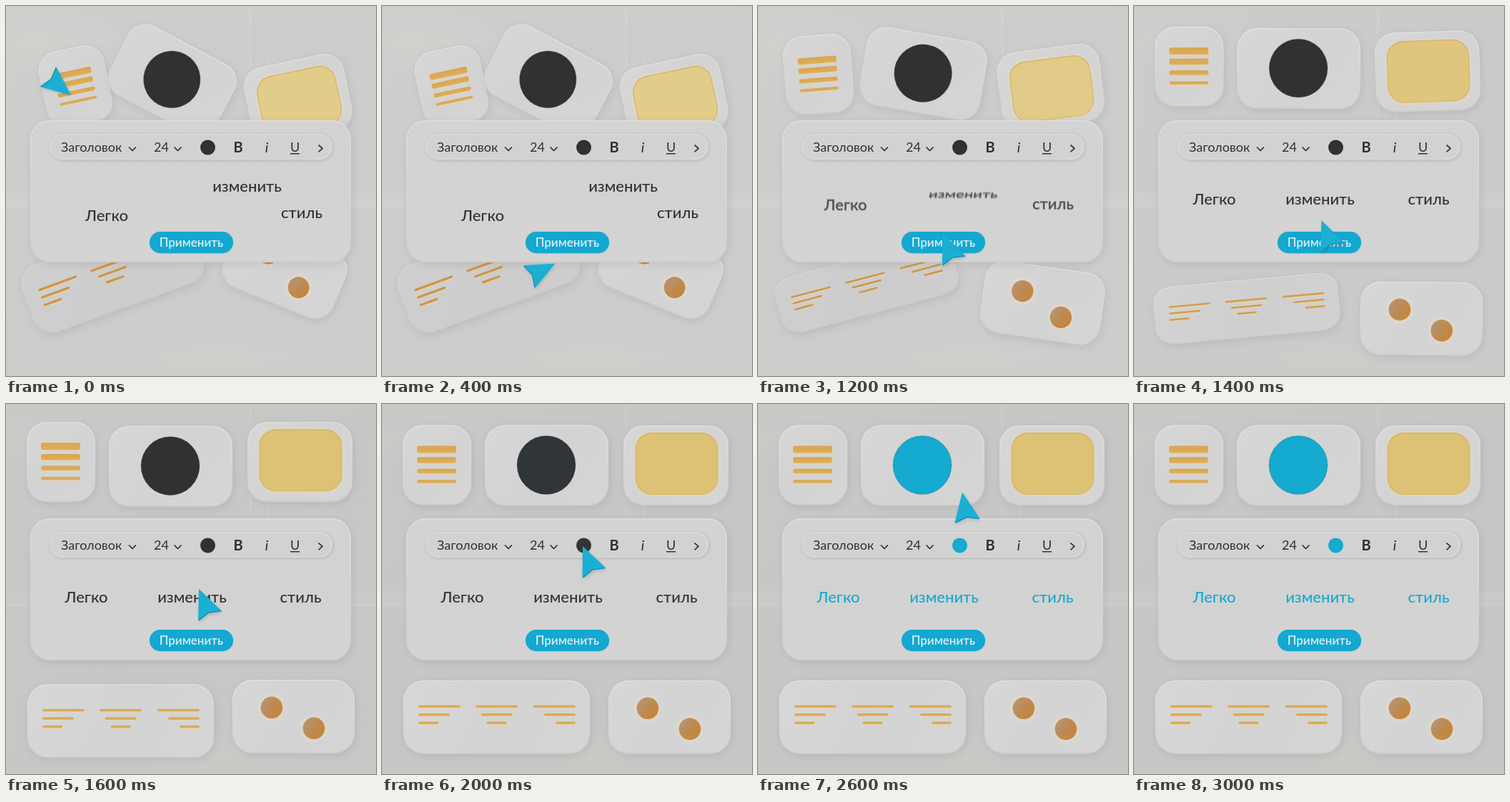
Animation, 518 px wide and 518 px high, one loop 4000 ms. Source, as an HTML page with a canvas:

```html
<!DOCTYPE html>
<html lang="ru">
<head>
<meta charset="utf-8">
<title>Легко изменить стиль</title>
<style>
html, body { margin: 0; width: 100%; height: 100%; overflow: hidden; background: #cbcbca; }
canvas { display: block; width: 518px; height: 518px; }
</style>
</head>
<body>
<canvas id="stage" width="518" height="518"></canvas>
<script>
const SIZE = 518, LOOP = 4000, STEP = 100, LAST = 3000;
const INK = [49, 49, 50], BLUE = [21, 170, 208];
const GOLD = [215, 166, 82], BROWN = [203, 146, 68];
const SAND = [221, 193, 117], PALE = [226, 204, 137];
const FONT = 'Lato, "Open Sans", "Noto Sans", sans-serif';
const ctx = document.getElementById('stage').getContext('2d');

const clamp = u => Math.max(0, Math.min(1, u));
const span = (t, a, b) => clamp((t - a) / (b - a));
const smooth = u => u * u * (3 - 2 * u);
const bump = u => Math.sin(Math.PI * u);
const mix = (a, b, u) => a + (b - a) * u;
const mixAll = (a, b, u) => a.map((v, i) => mix(v, b[i], u));
const rgb = c => `rgb(${c.map(Math.round).join(',')})`;
const rad = deg => deg * Math.PI / 180;

function at(x, y, deg, draw) {
  ctx.save();
  ctx.translate(x, y);
  ctx.rotate(rad(deg));
  draw();
  ctx.restore();
}

function shadow(color, blur, dx, dy) {
  ctx.shadowColor = color;
  ctx.shadowBlur = blur;
  ctx.shadowOffsetX = dx;
  ctx.shadowOffsetY = dy;
}

function gradient(x0, y0, x1, y1, ...colors) {
  const g = ctx.createLinearGradient(x0, y0, x1, y1);
  colors.forEach((c, i) => g.addColorStop(i / (colors.length - 1), c));
  return g;
}

function box(x, y, w, h, r, fill) {
  ctx.beginPath();
  ctx.roundRect(x, y, w, h, r);
  ctx.fillStyle = fill;
  ctx.fill();
}

function disc(x, y, r, fill) {
  ctx.beginPath();
  ctx.arc(x, y, r, 0, 7);
  ctx.fillStyle = fill;
  ctx.fill();
}

function poly(points, stroke, width) {
  ctx.beginPath();
  points.forEach(p => ctx.lineTo(...p));
  ctx.strokeStyle = stroke;
  ctx.lineWidth = width;
  ctx.stroke();
}

function label(str, x, y, font, fill, align = 'left') {
  ctx.font = `${font} ${FONT}`;
  ctx.textAlign = align;
  ctx.fillStyle = fill;
  ctx.fillText(str, x, y);
}

// Raised plate with a soft drop shadow and a bright rim
function plate(x, y, w, h, r, fill) {
  ctx.save();
  shadow('rgba(80,80,85,.14)', 12, 2, 3);
  box(x, y, w, h, r, fill);
  ctx.restore();
  ctx.beginPath();
  ctx.roundRect(x + .7, y + .7, w - 1.4, h - 1.4, r);
  ctx.strokeStyle = gradient(0, y, 0, y + h, 'rgba(228,228,228,.7)', 'rgba(220,220,220,.5)', 'rgba(196,196,196,.5)');
  ctx.lineWidth = 1.4;
  ctx.stroke();
}

function bar(x, y, w, h, tone = GOLD) {
  ctx.save();
  shadow('rgba(236,214,170,.7)', 3, 0, 1);
  const light = tone.map(v => v + 8);
  box(x, y - h / 2, w, h, Math.min(h / 2, 3), gradient(0, y - h / 2, 0, y + h / 2, rgb(tone), rgb(light)));
  ctx.restore();
}

function ball(x, y) {
  ctx.save();
  shadow('rgba(243,229,205,.9)', 6, 0, 0);
  disc(x, y, 15.5, '#cf9a55');
  ctx.restore();
  disc(x, y, 14.8, gradient(x - 13, y - 8, x + 13, y + 8, '#b59373', '#bd8a52', '#c5853a'));
}

// from / to are [x, y, angle]; spin and start time the turn and the move;
// lift is the overshoot, squash the foreshortening in flight, shade the tilted darkening
const cards = [
  { w: 96, h: 112, from: [97.5, 113, -12], to: [77, 85.5, 0], spin: 850, start: 850, lift: -4.5,
    draw(tint, tilt) {
      ctx.scale(1, 1 - .1 * tilt);
      [[-22, 10], [-7, 8.5], [8.5, 6.5], [23, 4.5]].forEach(([y, h]) => bar(-28, y, 55, h));
    } },
  { w: 173, h: 113, from: [232.5, 103.5, 28], to: [230.5, 86, 0], spin: 840, start: 900, lift: 1.2,
    draw(tint) {
      disc(-.5, -.5, 41, rgb(tint));
      ctx.strokeStyle = 'rgba(30,60,70,.25)';
      ctx.lineWidth = 1;
      ctx.stroke();
    } },
  { w: 147, h: 112, from: [409, 130, -12], to: [411.5, 86, 0], spin: 950, start: 950, lift: -5,
    draw(tint, tilt) {
      ctx.translate(0, 5.5 * tilt);
      ctx.save();
      shadow('rgba(236,220,180,.8)', 5, 0, 1);
      box(-57, -46, 116, 87, 23, '#d8b560');
      ctx.restore();
      box(-55.8, -44.5, 113.6, 84.5, 22, rgb(mixAll(SAND, PALE, tilt)));
    } },
  { w: 261, h: 103, from: [150, 375.5, -20], to: [160.5, 438.5, 0], spin: 1000, start: 1000, lift: 5.5,
    squash: .24, shade: .035,
    draw(tint, tilt) {
      const tone = mixAll(GOLD, BROWN, tilt);
      [59, 44, 28].forEach((w, i) => {
        const y = -15 + i * 11.5;
        [-109.5, -w / 2, 110.5 - w].forEach(x => bar(x, y, w, 3.4, tone));
      });
    } },
  { w: 171, h: 103, from: [390, 369, 22], to: [402.5, 438.5, 0], spin: 850, start: 830, lift: -1,
    draw() {
      ball(-30.5, -12.5);
      ball(28.5, 16.5);
    } }
];

function drawCard(card, t, tint) {
  const { w, h, from, to, squash = 0, shade = 0 } = card;
  const u = span(t, card.start, card.start + 600), p = smooth(u);
  const [x, y] = mixAll(from, to, p);
  const deg = mix(from[2], to[2], smooth(span(t, card.spin, card.spin + 600)));
  const tilt = 1 - p ** 3, size = mix(.97, 1, p);
  const over = card.lift * bump(span(t, 1350, 1950));
  at(x, y + over, deg, () => {
    ctx.scale(size, size * (1 - squash * bump(u)));
    plate(-w / 2, -h / 2, w, h, 28, gradient(-w / 2, -h / 2, w / 2, h / 2, '#d7d7d7', '#d3d3d3', '#d5d5d5'));
    if (shade) box(-w / 2, -h / 2, w, h, 28, `rgba(0,0,0,${shade * tilt})`);
    card.draw(tint, tilt);
  });
}

function glow(x, y, rx, ry, color) {
  ctx.save();
  ctx.translate(x, y);
  ctx.scale(rx, ry);
  const g = ctx.createRadialGradient(0, 0, 0, 0, 0, 1);
  g.addColorStop(0, `rgba(${color})`);
  g.addColorStop(1, `rgba(${color.replace(/[^,]+$/, '0')})`);
  disc(0, 0, 1, g);
  ctx.restore();
}

function drawWall(t) {
  ctx.fillStyle = gradient(0, 0, SIZE, SIZE, '#cfcecd', '#cccccb', '#cdcdcc');
  ctx.fillRect(0, 0, SIZE, SIZE);
  glow(50, 50, 130, 40, '214,211,206,.5');
  glow(290, 492, 170, 28, '212,209,203,.5');
  ctx.fillStyle = 'rgba(222,220,217,.5)';
  ctx.fillRect(341, 0, 1.5, 160);
  ctx.fillRect(365, 70, 1.5, 90);
  ctx.fillRect(0, 281, SIZE, 1.5);
  ctx.fillStyle = 'rgba(214,213,211,.25)';
  ctx.fillRect(0, 262, SIZE, 20);
  ctx.fillStyle = `rgba(0,0,0,${.03 * smooth(span(t, 1200, 1800))})`;
  ctx.fillRect(0, 0, SIZE, SIZE);
}

function drawPanel(tint) {
  const ink = rgb(INK);
  plate(34, 160, 449, 199, 27, gradient(0, 160, 0, 359, '#d3d3d3', '#d2d2d2', '#d4d4d4'));

  ctx.save();
  shadow('rgba(110,110,110,.3)', 5, 1, 1);
  box(61, 179, 396, 36, 18, '#dadada');
  ctx.restore();
  box(62.5, 180.5, 392, 33, 16.5, '#d2d2d2');

  label('Заголовок', 77, 204, '400 18px', ink);
  label('24', 207, 204, '400 18px', ink);
  [177, 240.5].forEach(x => poly([[x - 4.5, 198], [x, 202.5], [x + 4.5, 198]], ink, 1.7));
  disc(282.5, 198, 10.5, rgb(tint));
  label('B', 325, 205, '700 20px', ink, 'center');
  label('i', 365, 205, 'italic 400 20px', ink, 'center');
  label('U', 404.5, 203.5, '400 18px', ink, 'center');
  poly([[398.5, 206.8], [410.5, 206.8]], ink, 1.4);
  poly([[438, 195], [443, 199.4], [438, 203.8]], ink, 1.7);

  ctx.save();
  shadow('rgba(60,110,125,.3)', 2, 0, .5);
  box(201, 316, 117, 30, 15, '#12a8d0');
  ctx.restore();
  label('Применить', 259.5, 336.5, '600 17px', '#d9edf3', 'center');
}

const words = [
  { str: 'Легко', from: [141, 301], to: [112.5, 278] },
  { str: 'изменить', from: [337.5, 260], to: [260.5, 278], flips: true },
  { str: 'стиль', from: [414, 297], to: [412.5, 278] }
];

function drawWords(t, tint) {
  const u = span(t, 900, 1400), p = smooth(u);
  words.forEach(({ str, from, to, flips }) => {
    const [x, y] = mixAll(from, to, p);
    const blur = bump(u) * (flips ? 2 : .7);
    const copies = blur > .1 ? 5 : 1;
    ctx.save();
    ctx.translate(x, y - 8);
    if (flips) ctx.transform(1, 0, -.15 * bump(u), Math.abs(Math.cos(2 * Math.PI * p)), 0, 0);
    ctx.globalAlpha = copies > 1 ? .28 : 1;
    for (let i = 0; i < copies; i++) {
      const off = copies > 1 ? (i / (copies - 1) - .5) * 2 * blur : 0;
      label(str, off * .3, 8 + off, '500 22px', rgb(tint), 'center');
    }
    ctx.restore();
  });
}

const bezier = (a, b, c, d, u) => {
  const v = 1 - u;
  return v * v * v * a + 3 * v * v * u * b + 3 * v * u * u * c + u * u * u * d;
};

// Tip position and heading of the pointer
function pointerPose(t) {
  if (t < 800) {
    const u = t / 800, s = u * (2 - u);
    return [bezier(91, 160, 262, 256, s), bezier(125, 180, 470, 320, s), mix(129, -3, smooth(u))];
  }
  if (t < 1200) return mixAll([256, 320, -3], [259, 319, -22], smooth(span(t, 800, 1200)));
  if (t < 2200) return mixAll([259, 319, -22], [281, 199, -23], smooth(span(t, 1200, 2000)));
  return mixAll([281, 199, -23], [298, -60, 22], span(t, 2200, 2900) ** 2.2);
}

function drawPointer(t) {
  if (t >= 2900) return;
  const [x, y, deg] = pointerPose(t);
  const press = 1 - .09 * bump(span(t, 850, 1150)) - .08 * bump(span(t, 2000, 2300));
  const shape = dy => {
    ctx.beginPath();
    [[0, 0], [17.5, 40], [0, 35], [-17.5, 40]].forEach(([px, py]) => ctx.lineTo(px, py + dy));
    ctx.closePath();
    ctx.fill();
  };
  at(x, y, deg, () => {
    ctx.scale(press, press);
    ctx.save();
    shadow('rgba(60,70,80,.25)', 5, 1, 2);
    ctx.fillStyle = '#0e8fb4';
    shape(1.4);
    ctx.restore();
    ctx.fillStyle = '#19b0d4';
    shape(0);
  });
}

function render(t) {
  const tint = mixAll(INK, BLUE, smooth(span(t, 1950, 2400)));
  drawWall(t);
  cards.forEach(card => drawCard(card, t, tint));
  drawPanel(tint);
  drawWords(t, tint);
  drawPointer(t);
}

ctx.lineCap = ctx.lineJoin = 'round';
const begin = performance.now();
function tick() {
  const ms = (performance.now() - begin) % LOOP;
  render(Math.min(LAST, Math.floor(ms / STEP) * STEP));
  requestAnimationFrame(tick);
}
tick();
</script>
</body>
</html>
```
